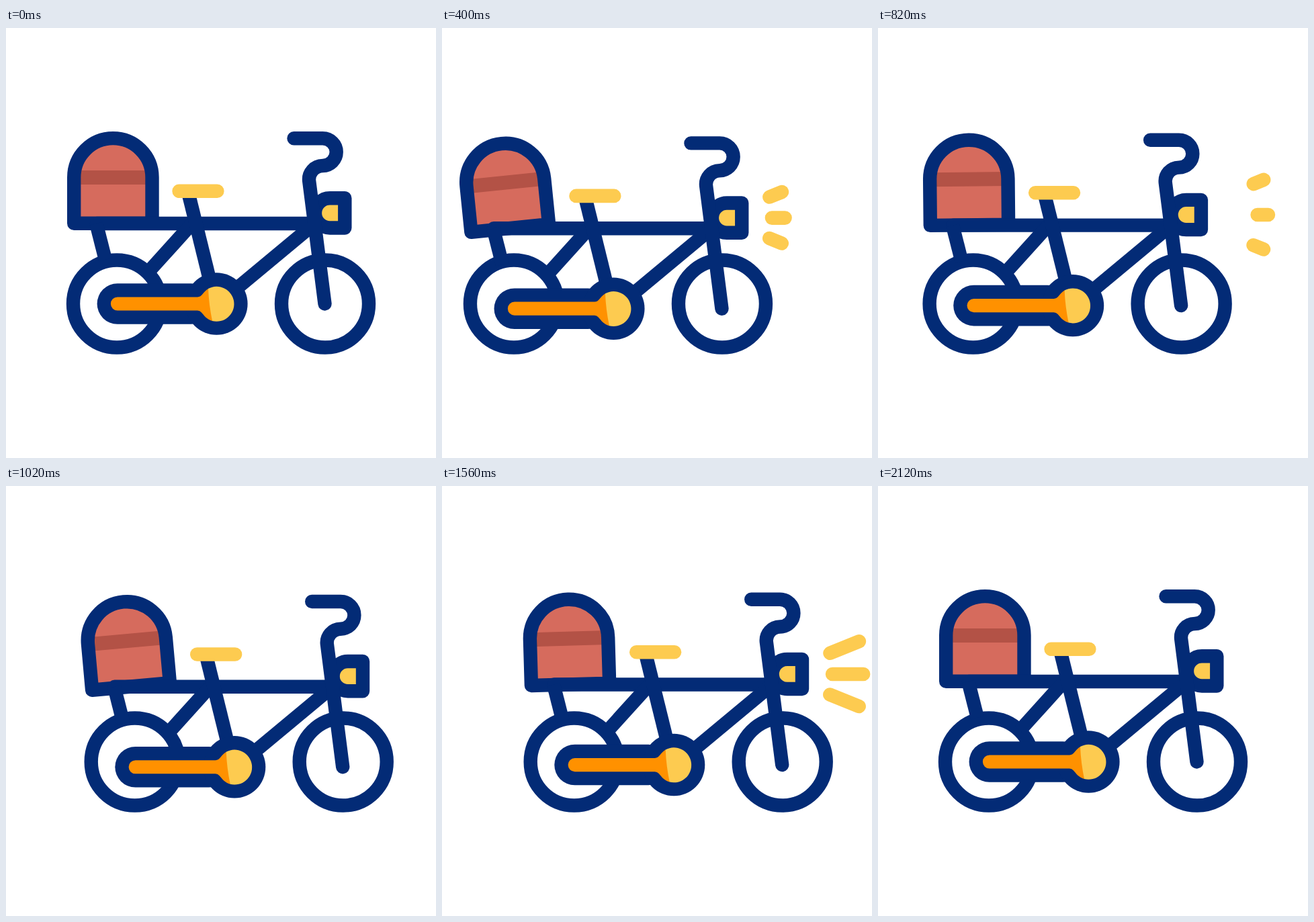
An HTML page that plays this animation: 640x640 px, repeating every 2.42 s.

```html
<!DOCTYPE html>
<html lang="en">
<head>
<meta charset="utf-8">
<title>Cargo bike</title>
<style>
  html, body { margin: 0; width: 100%; height: 100%; overflow: hidden; background: #fff; }
  svg { display: block; width: 100%; height: 100%; }
  .line { fill: none; stroke: #032b76; stroke-width: 20.4; stroke-linejoin: round; }
  .round { stroke-linecap: round; }
  .glow { fill: none; stroke: #fdcb50; stroke-width: 20.6; stroke-linecap: round; }
</style>
</head>
<body>
<svg viewBox="0 0 640 640">
  <g id="bike">
    <g class="line">
      <circle cx="165" cy="410.5" r="65"/>
      <circle cx="475" cy="410.5" r="65"/>
    </g>
    <g id="body">
      <g id="box">
        <path fill="#d66b5d" d="M101.2 290.7V222.3A58.1 58.1 0 0 1 217.5 222.3V290.7Z"/>
        <path fill="#b35246" d="M103 212H216V233H103Z"/>
        <path class="line" d="M101.2 290.7V222.3A58.1 58.1 0 0 1 217.5 222.3V290.7Z"/>
      </g>
      <!-- frame tubes -->
      <g class="line">
        <path class="round" d="M135 291H459"/>
        <path d="M134.3 291L148 345"/>
        <path d="M277 291L211 364"/>
        <path d="M272 248L304 378"/>
        <path d="M459.5 291L320 407"/>
      </g>
      <path class="glow" d="M257.6 242.7H314.3"/>
      <!-- chain guard -->
      <g fill="#032b76">
        <rect x="135.6" y="380.2" width="170" height="60.6" rx="30.3"/>
        <circle cx="313.4" cy="410.5" r="46.2"/>
      </g>
      <path fill="#ff9100" d="M166 400.4H285C292 400.4 293 393 301 388L309 400V425L307 436C299 434 295 428 291 423.5Q288.5 420.6 285 420.6H166A10.1 10.1 0 0 1 166 400.4Z"/>
      <path fill="#fdcb50" d="M301 388A26 26 0 1 1 307 436Q302 412 301 388Z"/>
      <!-- headlight, handlebar and fork -->
      <path class="line" style="fill:#fdcb50" d="M504.3 253.3V297.5H482A22.1 22.1 0 0 1 482 253.3Z"/>
      <path class="line round" d="M428.5 164.2H471.3A20.4 20.4 0 0 1 471.3 205A20.4 20.4 0 0 0 451.2 228L474.5 410.5"/>
      <path class="glow" id="rays"/>
    </g>
  </g>
</svg>
<script>
  const LOOP = 2420, TICK = 20;
  const BOB = 685, LAG = 67;
  const ride = [[0, 0], [527, -68], [1255, 57.5], [1910, 0]];
  const flashes = [220, 1226];
  const GROW = 448, WAIT = 313;
  // start x, start y, run x, run y
  const rayLines = [
    [545.5, 244.3, 52, -21],
    [549, 275.4, 55.3, 0],
    [545.3, 305.8, 52, 21]
  ];

  const bike = document.getElementById('bike');
  const body = document.getElementById('body');
  const box = document.getElementById('box');
  const rays = document.getElementById('rays');

  function ease(p) {
    p = Math.min(1, Math.max(0, p));
    return p * p * (3 - 2 * p);
  }

  function shift(t) {
    for (let i = 1; i < ride.length; i++) {
      const [t0, x0] = ride[i - 1], [t1, x1] = ride[i];
      if (t < t1) return x0 + (x1 - x0) * ease((t - t0) / (t1 - t0));
    }
    return 0;
  }

  // three bounces, each 0 -> 1 -> 0
  function bounce(t) {
    if (t < 0 || t > 3 * BOB) return 0;
    return (1 - Math.cos(2 * Math.PI * t / BOB)) / 2;
  }

  function rayPath(t) {
    for (const start of flashes) {
      const head = ease((t - start) / GROW);
      const tail = ease((t - start - WAIT) / GROW);
      if (head > tail) {
        return rayLines.map(([x, y, dx, dy]) =>
          `M${x + dx * tail} ${y + dy * tail}L${x + dx * head} ${y + dy * head}`).join('');
      }
    }
    return '';
  }

  function draw(t) {
    bike.setAttribute('transform', `translate(${shift(t)} 0)`);
    body.setAttribute('transform', `translate(0 ${7.75 * bounce(t)})`);
    box.setAttribute('transform', `rotate(${-5.8 * bounce(t - LAG)} 160 291)`);
    rays.setAttribute('d', rayPath(t));
  }

  const begin = performance.now();
  function loop() {
    const t = (performance.now() - begin) % LOOP;
    draw(Math.floor(t / TICK) * TICK);
    requestAnimationFrame(loop);
  }
  loop();
</script>
</body>
</html>
```
